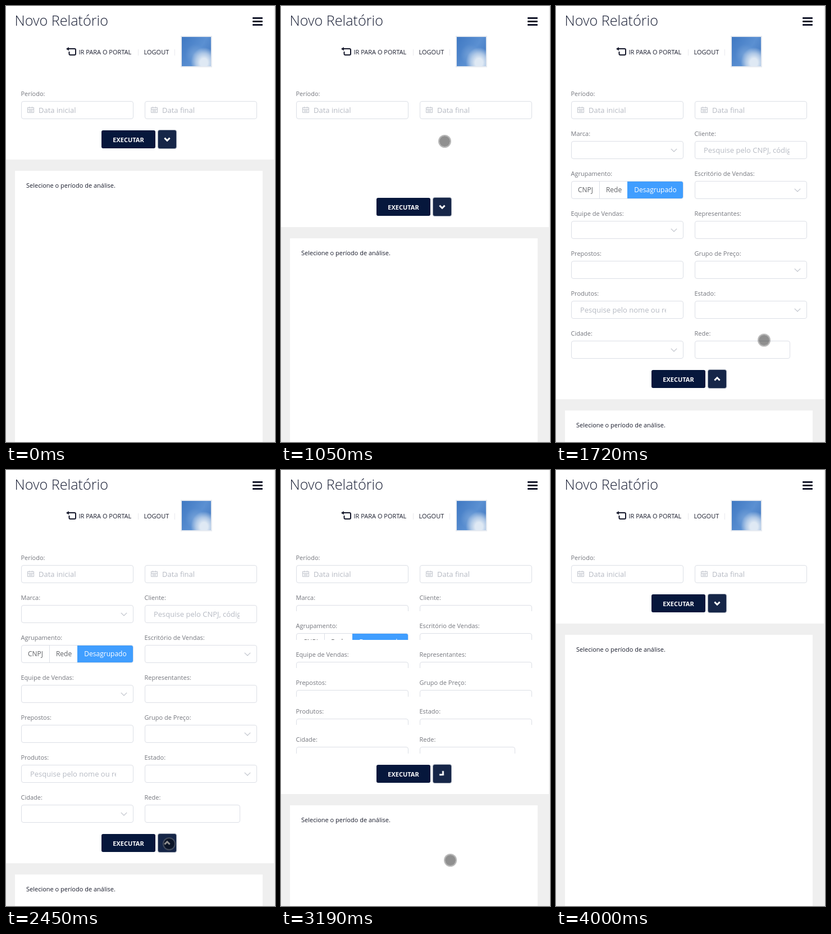
Write an HTML page that moves like this. It is 479x775 px and loops after 4980 ms.

```html
<!DOCTYPE html>
<html lang="pt-BR">
<head>
<meta charset="utf-8">
<title>Novo Relatório</title>
<style>
:root { --loop: 4980ms; --line: #dcdfe6; --hint: #b6bac3; --icon: #c0c4cc; }
* { box-sizing: border-box; }
html, body { margin: 0; width: 100%; height: 100%; overflow: hidden; background: #efefef; }
body { font: 11px/12px "Open Sans", sans-serif; color: #1b1e2e; }
#stage { position: absolute; left: 0; top: 0; width: 479px; height: 775px; overflow: hidden; }
#stage * { white-space: nowrap; }
.abs { position: absolute; }
svg { position: absolute; overflow: visible; fill: none; }

.top { left: 0; top: 0; width: 477px; height: 221px; background: #fff; }
.title { left: 15.5px; top: 7px; font-size: 25.2px; line-height: 36px; font-weight: 300; color: #1a2036; }
.menu { left: 439px; top: 20px; width: 18px; height: 15px; }
.menu i { display: block; height: 3px; margin-bottom: 3px; border-radius: 1px; background: #15182b; }
.sep { top: 77px; width: 1px; height: 11px; background: #e9e9ee; }
.photo {
  left: 311px; top: 53px; width: 56px; height: 56px; border: 2px solid #e7ebf1;
  background:
    radial-gradient(ellipse at 76% 88%, #dfe9f4 0 12%, #c3d6eccc 26%, #8ab2e000 42%),
    radial-gradient(ellipse at 45% 60%, #8fb3de88 0, #7fa8dc00 42%),
    linear-gradient(120deg, #3f78c2, #5b90d2 55%, #3f74bd);
}

.label { position: absolute; color: #74767d; }
.box {
  position: absolute; width: 200px; height: 32px; border: 1px solid var(--line); border-radius: 4px;
  background: #fff; color: var(--hint); font-size: 13px; line-height: 30px;
}
.box span { position: absolute; left: 15px; right: 30px; top: 0; height: 30px; overflow: hidden; }
.box.date { top: 169px; padding-left: 30px; }
.box svg { stroke: var(--icon); }

.flow { left: 0; top: 221px; width: 479px; }
.row {
  position: relative; width: 477px; height: 0; overflow: hidden;
  animation: unfold var(--loop) infinite;
}
.gap { width: 477px; height: 0; animation: gap var(--loop) step-end infinite; }
#fields, .bar { width: 477px; background: #fff; }
.row .box { top: 19px; }
.group { color: #606266; font-size: 12px; overflow: hidden; }
.group b { position: absolute; top: 0; height: 30px; font-weight: 400; text-align: center; }
.group b + b { border-left: 1px solid var(--line); }
.group b.on { top: -1px; height: 32px; line-height: 32px; border: 0; background: #409eff; color: #fff; }

.bar { position: relative; height: 52px; }
.run {
  left: 170px; top: 0; width: 96px; height: 32px; border-radius: 3px; background: #06173c;
  color: #fff; font-weight: 700; line-height: 33px; text-align: center;
}
.more {
  left: 271px; top: 0; width: 32px; height: 32px; border-radius: 3px;
  background: #162648; box-shadow: 0 0 0 1px rgba(22, 38, 72, .45);
}
.more svg { left: 16px; top: 16px; width: 1px; height: 1px; animation: flip var(--loop) infinite; transform-origin: 0 0; }
.card { margin: 20px 0 0 16px; width: 441px; height: 600px; padding: 20px; background: #fff; }

.dot {
  left: -11.5px; top: -11.5px; width: 23px; height: 23px; border-radius: 50%;
  background: rgba(0, 0, 0, .44); background-clip: padding-box;
  border: 2px solid rgba(110, 110, 110, .5);
  animation: travel var(--loop) linear infinite;
}

@keyframes unfold {
  0%, 67.43%, 100% { height: 0; }
  21.11% { height: 0; animation-timing-function: ease-in-out; }
  27.13% { height: 51px; }
  61.41% { height: 51px; animation-timing-function: ease-in-out; }
}
@keyframes gap {
  0%, 67.43%, 100% { height: 0; }
  21.08% { height: 20px; }
}
@keyframes flip {
  0%, 67.43%, 100% { transform: rotate(0); }
  21.11% { transform: rotate(0); animation-timing-function: ease; }
  27.13% { transform: rotate(-180deg); }
  61.41% { transform: rotate(-180deg); animation-timing-function: ease; }
}
@keyframes travel {
  0%, 2.2% { transform: translate(451px, 800px); }
  2.21% { transform: translate(451px, 724px); }
  4.02% { transform: translate(408px, 580px); }
  5.42% { transform: translate(378px, 478px); }
  6.63% { transform: translate(364px, 414px); }
  7.63% { transform: translate(357px, 360px); }
  8.63% { transform: translate(350px, 307px); }
  9.84% { transform: translate(341px, 262px); }
  10.84% { transform: translate(318px, 248px); }
  12.05%, 13.05% { transform: translate(298px, 246px); }
  13.45%, 25.9% { transform: translate(291px, 240px); }
  27.31%, 28.51% { transform: translate(291px, 274px); }
  31.33% { transform: translate(332px, 425px); }
  34.54% { transform: translate(370px, 593px); }
  36.14% { transform: translate(367px, 632px); }
  38.76%, 39.56% { transform: translate(346px, 673px); }
  43.17% { transform: translate(314px, 675px); }
  48.19%, 61.45% { transform: translate(290px, 664px); }
  64.06% { transform: translate(301px, 693px); }
  69.08%, 70.28% { transform: translate(321px, 716px); }
  79.52% { transform: translate(440px, 780px); }
  80.32%, 100% { transform: translate(451px, 800px); }
}
</style>
</head>
<body>
<div id="stage">
  <div class="abs top">
    <div class="abs title">Novo Relatório</div>
    <div class="abs menu"><i></i><i></i><i></i></div>
    <svg style="left:107px;top:73px" width="18" height="15" stroke="#15182b" stroke-width="2">
      <path d="M3 3H15a2 2 0 0 1 2 2V12a2 2 0 0 1-2 2H7.5a2 2 0 0 1-2-2V8"/>
      <path d="M0 3.2 4.8 0V6.6Z" fill="#15182b" stroke="none"/>
    </svg>
    <div class="abs" style="left:129.5px;top:76px">IR PARA O PORTAL</div>
    <div class="abs sep" style="left:235px"></div>
    <div class="abs" style="left:245.5px;top:76px">LOGOUT</div>
    <div class="abs sep" style="left:300px"></div>
    <div class="abs photo"></div>
    <div class="label" style="left:26.5px;top:150px">Período:</div>
    <div class="box date" style="left:27px">Data inicial</div>
    <div class="box date" style="left:247px">Data final</div>
  </div>

  <div class="abs flow">
    <div id="fields"></div>
    <div class="bar">
      <div class="abs run">EXECUTAR</div>
      <div class="abs more">
        <svg><path d="M-4.6 -2.4 0 2.2 4.6 -2.4" stroke="#fff" stroke-width="2.9"/></svg>
      </div>
    </div>
    <div class="card">Selecione o período de análise.</div>
  </div>

  <div class="abs dot"></div>
</div>

<script>
const calendar = `<svg style="left:10px;top:9px" width="12" height="12">
  <path d="M.5 1.5H11.5V10.5H.5ZM.5 4.5H11.5M3.5 0V2.5M8.5 0V2.5M2.5 6.5H9.5M2.5 8.5H9.5"/></svg>`;
const chevron = `<svg style="left:176px;top:11.5px" width="12" height="7">
  <path d="M.8 .8 6 6 11.2 .8" stroke-width="1.2"/></svg>`;
const radios = `<b style="left:0;width:49px">CNPJ</b><b style="left:49px;width:51px">Rede</b>
  <b class="on" style="left:99px;width:100px">Desagrupado</b>`;
const hint = text => `<span>${text}</span>`;

// label, content of the box, extra class, width
const rows = [
  [["Marca", chevron], ["Cliente", hint("Pesquise pelo CNPJ, código ou nome")]],
  [["Agrupamento", radios, "group"], ["Escritório de Vendas", chevron]],
  [["Equipe de Vendas", chevron], ["Representantes", ""]],
  [["Prepostos", ""], ["Grupo de Preço", chevron]],
  [["Produtos", hint("Pesquise pelo nome ou referência")], ["Estado", chevron]],
  [["Cidade", chevron], ["Rede", "", "", 170]],
];

const field = ([name, content, kind = "", width = 200], col) => {
  const x = 27 + 220 * col;
  return `<div class="label" style="left:${x - 0.5}px;top:0">${name}:</div>
    <div class="box ${kind}" style="left:${x}px;width:${width}px">${content}</div>`;
};

document.getElementById("fields").innerHTML =
  rows.map(r => `<div class="row">${r.map(field).join("")}</div><div class="gap"></div>`).join("");
document.querySelectorAll(".date").forEach(d => d.insertAdjacentHTML("beforeend", calendar));
</script>
</body>
</html>
```
